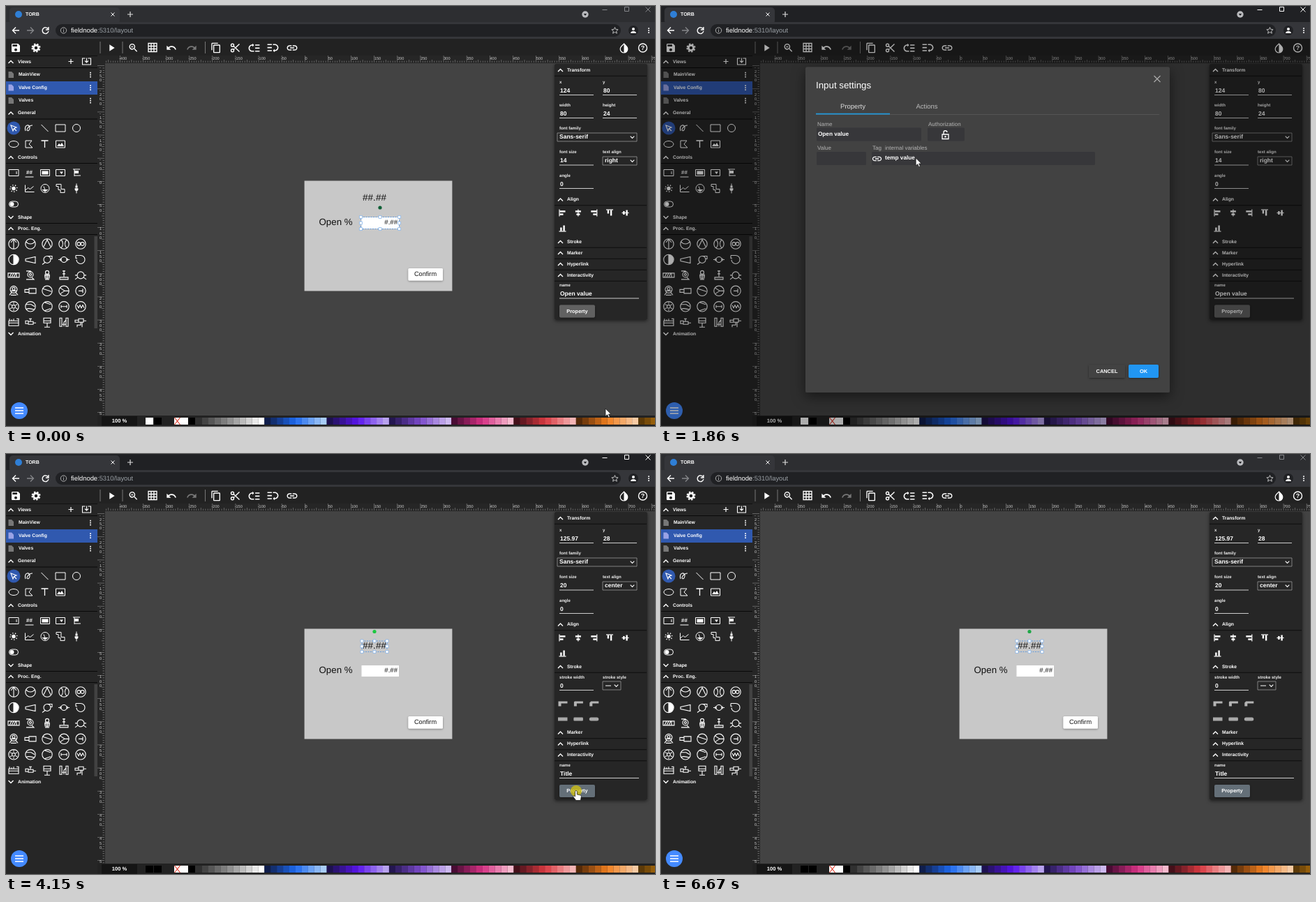
An HTML page with a canvas for the animation above (6.79 s loop, 930 by 602 pixels).

```html
<!DOCTYPE html>
<html lang="en">
<meta charset="utf-8">
<title>View editor</title>
<style>
html, body { margin: 0; width: 100%; height: 100%; overflow: hidden; background: #262626 }
canvas { display: block }
</style>
<canvas id="stage" width="930" height="602"></canvas>
<script>
const LOOP = 6790;
const g = document.getElementById('stage').getContext('2d');
g.textBaseline = 'middle';
g.textRendering = 'geometricPrecision';

// ---- drawing helpers
const box = (x, y, w, h, color, r = 0) => {
  g.fillStyle = color;
  g.beginPath();
  g.roundRect(x, y, w, h, r);
  g.fill();
};
// The shadow is painted around the box only, so translucent boxes stay clean.
const raised = (x, y, w, h, color, r, blur = 3, drop = 1, dark = .4) => {
  g.save();
  const outside = new Path2D();
  outside.rect(0, 0, 930, 602);
  outside.rect(x, y, w, h);
  g.clip(outside, 'evenodd');
  g.shadowColor = `rgba(0,0,0,${dark})`;
  g.shadowBlur = blur;
  g.shadowOffsetY = drop;
  box(x, y, w, h, color, r);
  g.restore();
  box(x, y, w, h, color, r);
};
const text = (s, x, y, size = 6.8, color = '#fff', weight = 'bold', align = 'left') => {
  g.font = `${weight} ${size}px "Liberation Sans", Arial, sans-serif`;
  g.textAlign = align;
  g.fillStyle = color;
  g.fillText(s, x, y);
};
const plain = (s, x, y, size, color = '#fff', align) => text(s, x, y, size, color, 'normal', align);
const at = (x, y, scale, paint) => {
  g.save();
  g.translate(x, y);
  g.scale(scale, scale);
  paint();
  g.restore();
};
const line = (x, y, d, color = '#fff', w = 1, dash = []) => at(x, y, 1, () => {
  g.strokeStyle = color;
  g.lineWidth = w;
  g.setLineDash(dash);
  g.stroke(new Path2D(d));
});
const shape = (x, y, d, color = '#fff', scale = 1) => at(x, y, scale, () => {
  g.fillStyle = color;
  g.fill(new Path2D(d));
});
const glyph = (x, y, d, size = 16, color = '#fff', flipX = 1, flipY = 1) => at(x, y, size / 24, () => {
  g.scale(flipX, flipY);
  shape(-12, -12, d, color);
});
const ring = (r, x = 0, y = 0) => `M${x - r} ${y}a${r} ${r} 0 1 0 ${2 * r} 0a${r} ${r} 0 1 0 ${-2 * r} 0`;
const chevron = (x, y, up = true) => line(x, y, up ? 'M-3.5 2L0-1.5 3.5 2' : 'M-3.5-2L0 1.5 3.5-2', '#fff', 1.4);
const dots = (x, y) => [-3, 0, 3].forEach(d => box(x - .8, y + d - .8, 1.7, 1.7, '#fff'));

// ---- timing helpers
const clamp = v => Math.min(1, Math.max(0, v));
const within = (t, ...spans) => spans.some(([a, b]) => t >= a && t < b);
const bezier = (x1, y1, x2, y2) => x => {
  if (x <= 0 || x >= 1) return clamp(x);
  const f = (a, b, s) => 3 * a * s * (1 - s) ** 2 + 3 * b * s * s * (1 - s) + s ** 3;
  let lo = 0, hi = 1;
  for (let i = 0; i < 20; i++) {
    const mid = (lo + hi) / 2;
    f(x1, x2, mid) < x ? lo = mid : hi = mid;
  }
  return f(y1, y2, lo);
};
const easeEnter = bezier(0, 0, .2, 1);
const easeExit = bezier(.4, 0, .2, 1);
const easeShade = bezier(.25, .8, .25, 1);

const LINK = 'M3.9 12c0-1.71 1.39-3.1 3.1-3.1h4V7H7c-2.76 0-5 2.24-5 5s2.24 5 5 5h4v-1.9H7c-1.71 0-3.1-1.39-3.1-3.1zM8 13h8v-2H8v2zm9-6h-4v1.9h4c1.71 0 3.1 1.39 3.1 3.1s-1.39 3.1-3.1 3.1h-4V17h4c2.76 0 5-2.24 5-5s-2.24-5-5-5z';
const UNDO = 'M12.5 8c-2.65 0-5.05.99-6.9 2.6L2 7v9h9l-3.62-3.62c1.39-1.16 3.16-1.88 5.12-1.88 3.54 0 6.55 2.31 7.6 5.5l2.37-.78C21.08 11.03 17.15 8 12.5 8z';
const SAVE = 'M17 3H5c-1.1 0-2 .9-2 2v14c0 1.1.9 2 2 2h14c1.1 0 2-.9 2-2V7l-4-4zm-5 16c-1.66 0-3-1.34-3-3s1.34-3 3-3 3 1.34 3 3-1.34 3-3 3zm3-10H5V5h10v4z';
const ZOOM = 'M15.5 14h-.79l-.28-.27A6.47 6.47 0 0 0 16 9.5 6.5 6.5 0 1 0 9.5 16c1.61 0 3.09-.59 4.23-1.57l.27.28v.79l5 4.99L20.49 19l-4.99-5zm-6 0C7.01 14 5 11.99 5 9.5S7.01 5 9.5 5 14 7.01 14 9.5 11.99 14 9.5 14zM12 10h-2v2H9v-2H7V9h2V7h1v2h2z';
const COPY = 'M16 1H4c-1.1 0-2 .9-2 2v14h2V3h12V1zm3 4H8c-1.1 0-2 .9-2 2v14c0 1.1.9 2 2 2h11c1.1 0 2-.9 2-2V7c0-1.1-.9-2-2-2zm0 16H8V7h11v14z';
const ORDER = 'M14 5h8v2h-8zm0 5.5h8v2h-8zm0 5.5h8v2h-8zM2 11.5C2 15.08 4.92 18 8.5 18H9v2l3-3-3-3v2h-.5C6.02 16 4 13.98 4 11.5S6.02 7 8.5 7H12V5H8.5C4.92 5 2 7.92 2 11.5z';

function browser(focused) {
  const control = focused ? '#fff' : '#85868a';
  box(0, 0, 930, 23, focused ? '#202124' : '#2d2e31');
  box(5, 2, 158, 24, '#35363a', 5);
  box(0, 23, 930, 24, '#35363a');
  box(71, 26, 810, 18, '#202124', 9);
  shape(18, 12, ring(5), '#2f7fd6');
  text('TORB', 28, 12, 7);
  line(153, 12, 'M-2.5-2.5l5 5m0-5l-5 5', '#fff');
  line(178, 12, 'M-4 0h8M0-4v8', '#ddd', 1.2);
  shape(830, 12, ring(4.7), '#b9babd');
  shape(830, 12, 'M-2.2-1h4.4L0 2z', '#202124');
  line(858, 5.5, 'M-3.5 0h7', control);
  line(889.5, 4.5, 'M-3-3h6v6h-6z', control);
  line(920, 5, 'M-3.5-3.5l7 7m0-7l-7 7', control);
  line(14, 35, 'M5 0h-9.5M0-4.5L-4.5 0 0 4.5', '#fff', 1.4);
  line(35, 35, 'M-5 0h9.5M0-4.5L4.5 0 0 4.5', '#85868a', 1.3);
  line(56.5, 35, 'M3.6-2.4A4.4 4.4 0 1 0 4.4 1M4.4-5v4h-4', '#fff', 1.4);
  line(82.5, 35, ring(4.2) + 'M0-.6v3M0-2.5v1.1', '#bbb', .9);
  plain('fieldnode', 93, 35, 9.4, '#fff');
  plain(':5310/layout', 93 + g.measureText('fieldnode').width, 35, 9.4, '#9aa0a6');
  line(872.5, 35, 'M0-4.5l1.3 3 3.3.3-2.5 2.2.8 3.2L0 2.5l-2.9 1.7.8-3.2-2.5-2.2 3.3-.3z', '#ccc', .9);
  shape(899, 35, ring(7), '#202124');
  shape(899, 35, ring(2, 0, -2) + 'M-4 4c0-4 8-4 8 0z');
  dots(921, 35);
}

function toolbar() {
  box(0, 47, 930, 24, '#222');
  glyph(14, 60, SAVE);
  line(43, 60, ring(3.6), '#fff', 2.7);
  line(43, 60, ring(5.6), '#fff', 1.8, [2.4, 2]);
  for (const x of [134.5, 166.5, 285]) box(x, 51, 1, 17, '#777');
  glyph(151, 60, 'M8 5v14l11-7z');
  glyph(182.5, 60, ZOOM);
  line(210, 59.5, 'M-6-6h12v12h-12zM-6-2h12M-6 2h12M-2-6v12M2-6v12', '#fff', 1.3);
  glyph(237, 60, UNDO);
  glyph(266, 60, UNDO, 16, '#777', -1);
  glyph(301, 60, COPY);
  line(328.5, 60, ring(2, -4, -3.8) + ring(2, -4, 3.8) + 'M-2.4-2.4L6 5.5M-2.4 2.4L6-5.5', '#fff', 1.4);
  glyph(355.5, 60, ORDER, 19, '#fff', 1, -1);
  glyph(382.5, 60, ORDER, 19, '#fff', -1);
  glyph(410, 60, LINK, 18);
  line(885.5, 60, 'M0-6L3.8-2A5.3 5.3 0 1 1-3.8-2z', '#fff', 1.2);
  shape(885.5, 60, 'M0-6L3.8-2A5.3 5.3 0 0 1 0 7z');
  line(912.5, 60, ring(6), '#fff', 1.4);
  text('?', 912.5, 60.3, 9, '#fff', 'bold', 'center');
}

const RING = ring(7.2);
const PROC_ICONS = [
  RING + 'M0-7V7M-4-2L0-7 4-2', RING + 'M-6-3c3 4 9 4 12 0', RING + 'M-5 4L0-6 5 4', RING + 'M-4-6c4 4 3 8 0 12M4-6c-4 4-3 8 0 12', RING + ring(2.4, -2.6) + ring(2.4, 2.6),
  RING + 'M0-7V7', 'M-7-1L7-4V5L-7 2z', ring(5) + 'M-7 7l4-3M0-5h7v4H5', ring(4) + 'M-8 0h4M4 0h4M-5-2v4M5-2v4', 'M-7-6h7a6 6 0 1 1-6 6M-7-6v4h2',
  'M-8-3H8v6H-8zM-6 3l3-6M-3 3l3-6M0 3l3-6M4-3v6', ring(4, 0, -1) + ring(1.5, 0, -1) + 'M-6 6h11L2 3M-6-6h6v2', ring(2.5, 0, -4) + 'M-3-1h6v5h-6zM-3 6h6M0-1v7M-4 1h8', 'M0-7v9M-2-6h4M-6 3h12v3H-6zM-2-2h4', ring(5) + 'M-8 6l4-3M8 6L4 3M-8 0h3M5 0h3',
  ring(5, 0, -2) + ring(2, 0, -3) + 'M-6 6l3-4M6 6L3 2M-4 6h8M-5 0h10', 'M-8-2h6v4h-6zM-2-3.5h10v7H-2z', RING + 'M-6-3L6 1', RING + 'M-5-4L1 0l-6 4M1 0h6', RING + 'M-3 0h6M3-3v6',
  RING + ring(2.4) + 'M-5-3l2 1M5-3L3-2M-5 3l2-1M5 3L3 2M0-6v2M0 4v2', RING + 'M-6-3h7l5 3M-6 4c4-3 7 0 11 0', RING + 'M-4-6l9 3M-4 6l9-3', RING + 'M-4-2v4M4-2v4M-4 0h8', RING + 'M-5-2l2 4 2-4 2 4 2-4 2 4',
  'M-7-2H7v7H-7zM-7 1H7M-6-5v3M-3-4v2M0-5v3M4-5h3v3', 'M-7-2h4v4h-4zM-3-1h7v4h-7zM4 1h4M0-5v4M-2-5h4', 'M-5-6H5V1H-5zM-5-2H5M0 1v6M-4 7h8', 'M-6-6h3V6h-3zM3-6h3V6H3zM-3 3h6M0 0v6M0 0l3-3', 'M-8-3h5v3h-5zM-3-5h7v5h-7zM4-2h4M0 0v4h-5v3M2 0v7',
];

function sidebar() {
  box(0, 71, 131, 531, '#262626');
  const heading = (label, y, up = true) => {
    chevron(7, y, up);
    text(label, 17, y);
    if (up) box(0, y + 8, 131, 1, '#090909');
  };
  box(0, 71, 131, 1, '#111');
  heading('Views', 80);
  line(93, 79.5, 'M-3.5 0h7M0-3.5v7', '#fff', 1.2);
  line(115.5, 79.5, 'M-2-4.5h-4v9H6v-9H2M0-5v6M-2.5-1L0 1.5 2.5-1', '#fff', 1.1);
  box(0, 108, 131, 19, '#3059af');
  ['MainView', 'Valve Config', 'Valves'].forEach((label, i) => {
    const y = 98.5 + i * 18.5;
    shape(7, y, 'M-3.5-4.5h4.5l3 3v6h-7.5z', i == 1 ? '#9aa3e6' : '#777');
    text(label, 18, y);
    dots(121, y);
  });
  heading('General', 153.5);
  shape(11, 175, ring(9.5), '#3059af');
  line(11, 175, 'M-4-4L-1 4 .5.5 4-1zM.5.5L4 4', '#fff', 1.1);
  line(33, 175, 'M-5 4c-3-10 7-10 6-4s-6 4-3 0 5-4 7-4', '#fff', 1.1);
  line(55.5, 175, 'M-5-5L5 5');
  line(78, 175, 'M-7-5H7V5H-7z');
  line(101, 175, ring(5.5));
  line(11, 198, 'M-7 0a7 4.5 0 1 0 14 0a7 4.5 0 1 0-14 0');
  line(33, 198, 'M-5-5h9L0 0l5 5H-5z');
  line(55.5, 198, 'M-5-5H5M0-5V5', '#fff', 1.3);
  line(78, 198, 'M-6.5-5h13V5h-13z');
  shape(78, 198, 'M-5 3l3-4 2 2 2-3 3 5z');

  heading('Controls', 217);
  line(11, 239, 'M-7-4.5H7v9H-7zM4-2v4');
  text('##', 33.5, 239, 8, '#fff', 'bold', 'center');
  line(33.5, 245, 'M-6 0H6');
  line(56, 239, 'M-6.5-4.5h13v9h-13z');
  box(51.5, 236.5, 9, 5, '#fff');
  line(78, 239, 'M-6.5-4.5h13v9h-13z');
  shape(79.5, 239, 'M-2.5-1.5h5L0 2z');
  line(101, 239, 'M-5-5H5M-3-5V5M-3 4H6');
  box(98, 236, 6, 4, '#fff');
  shape(11, 261.5, ring(2.7));
  line(11, 261.5, ring(4.8), '#fff', 1.6, [1.2, 2.57]);
  line(33.5, 261.5, 'M-6-5V5H7M-6 3l4-4 3 2 5-4');
  line(56, 261.5, ring(6) + 'M-4 2H4M0 2l-2-5');
  shape(56, 261.5, 'M-4 2H4L0 5z');
  line(78, 261.5, 'M-6-6h7v7h5v5H0v-4h-3v-5h-3z');
  line(101, 261.5, 'M0-7V7');
  shape(101, 261.5, ring(2.5, 0, 1) + 'M-1.5-4h3v4h-3z');
  line(11, 284, 'M-2.5-4h5a4 4 0 0 1 0 8h-5a4 4 0 0 1 0-8z');
  shape(8.5, 284, ring(3));

  heading('Shape', 303, false);
  box(0, 311, 131, 1, '#090909');
  heading('Proc. Eng.', 319);
  PROC_ICONS.forEach((d, i) => line(11 + i % 5 * 24, 341 + Math.floor(i / 5) * 22.45, d, '#fff', 1.1));
  shape(11, 363.4, 'M0-7a7 7 0 0 1 0 14z');
  box(126.5, 330, 4.5, 132, '#424242');
  heading('Animation', 470, false);
  shape(19, 580, ring(12), '#448aff');
  line(19, 580, 'M-6-4H6M-6 0H6M-6 4H6', '#fff', 1.4);
}

function rulers() {
  const unit = .6625;
  box(131, 71, 799, 11, '#262626');
  box(131, 71, 11, 517, '#262626');
  const length = v => v % 50 == 0 ? 10 : v % 25 == 0 ? 4 : 2.5;
  for (let v = -430; v < 760; v += 5) {
    const x = 428 + v * unit;
    if (x < 142) continue;
    box(x, 81 - length(v), .6, length(v), '#8d8d8d');
    if (v % 50 == 0) plain(v, x + (v < 0 ? -1 : .5), 75, 5.6, '#d0d0d0');
  }
  for (let v = -250; v < 510; v += 5) {
    const y = 251 + v * unit;
    if (y < 82) continue;
    box(141 - length(v), y, length(v), .6, '#8d8d8d');
    if (v % 50 == 0) [...String(v)].forEach((c, i) => plain(c, 134, y + 2.6 + i * 6.3, 5.6, '#d0d0d0'));
  }
}

const RAMPS = ['444444 9a9a9a ffffff', '101e4c 1d69ee a9cdf8', '1d1150 5a14ee b8a2ee', '241650 7b4acb cdb9f0',
  '4a0c34 d53184 f7bacf', '45101a d83840 f4b4b4', '552a08 f07e1e f8cba4', '5c3a08 d98c10 f8dca0']
  .map(r => r.split(' ').map(c => [0, 2, 4].map(k => parseInt(c.slice(k, k + 2), 16))));

function palette(titleSelected) {
  box(131, 587, 799, 15, '#222');
  box(137, 588, 51, 14, '#151515');
  text('100 %', 162.5, 595, 7.6, '#fff', 'bold', 'center');
  box(200, 590, 11, 10, titleSelected ? '#000' : '#fff');
  box(212, 590, 11, 10, '#000');
  box(241, 590, 20, 10, '#fff');
  line(245.5, 595, 'M-4-5L4 5M4-5L-4 5', '#e03020', 1.1);
  box(261, 590, 10, 10, '#000');
  box(271, 590, 10, 10, '#303030');
  for (let i = 0; i < 73; i++) {
    const [dark, mid, light] = RAMPS[Math.floor(i / 10)];
    const k = i % 10 / 4.5;
    const [a, b, f] = k < 1 ? [dark, mid, k] : [mid, light, k - 1];
    box(281 + i * 8.93, 590, 9, 10, `rgb(${a.map((c, n) => Math.round(c + (b[n] - c) * f))})`);
  }
}

function selection(x, y, w, h, knobY, knob) {
  line(x, y, `M0 0h${w}v${h}h${-w}z`, '#4a90e2', .8, [2, 1.5]);
  for (const i of [0, .5, 1]) for (const j of [0, .5, 1]) {
    if (i == .5 && j == .5) continue;
    box(x + w * i - 2, y + h * j - 2, 4, 4, '#fff', .8);
    line(x + w * i, y + h * j, 'M-2-2h4v4h-4z', '#7fb0ea', .7);
  }
  shape(x + w / 2, knobY, ring(2.6), knob);
}

function canvasView(titleSelected, hot) {
  box(142, 82, 788, 505, '#434343');
  box(427.6, 250.5, 211.8, 158, '#c8c8c8');
  plain('##.##', 528, 275.5, 13.5, '#111', 'center');
  plain('Open %', 448.5, 310.5, 13.3, '#111');
  box(509.5, 303, 53.5, 16, '#fff');
  plain('#.##', 561, 310.7, 9.6, '#111', 'right');
  raised(576.5, 376, 49.5, 17.5, '#fff', 1.5);
  plain('Confirm', 601, 384.5, 9.2, '#111', 'center');
  if (titleSelected) selection(510, 268, 36, 15.5, 254.5, hot ? '#1cc840' : '#20a848');
  else selection(508.5, 302.5, 55, 17, 289, '#0d5f35');
}

function alignIcon(x, y, anchor, vertical) {
  at(x, y, 1, () => {
    if (vertical) g.rotate(Math.PI / 2);
    box(anchor * 4.5 - .6, -5, 1.2, 10, '#fff');
    [[8, -3.3], [5, .9]].forEach(([w, top]) => box((anchor * (8 - w) - w) / 2, top, w, 2.4, '#fff'));
  });
}

function propertyPanel(titleSelected, lit) {
  const up = titleSelected ? 33 : 0;
  const low = titleSelected ? 45.6 : 0;
  raised(786, 83, 133, titleSelected ? 413 : 367, '#262626', 2, 5, 1.5, .55);
  const heading = (label, y) => {
    chevron(794.5, y);
    text(label, 804, y);
    box(786, y + 7.7, 132, 1, '#0c0c0c');
  };
  const field = (label, value, x, y, w = 49) => {
    text(label, x, y, 6.1, '#eee');
    text(value, x + 1, y + 12.6, 8.5);
    box(x, y + 18, w, .9, '#ccc');
  };
  const select = (value, x, y, w) => {
    line(x, y, `M0-6h${w}V6H0z`, '#999', .8);
    text(value, x + 3, y, 8.5);
    line(x + w - 6.5, y, 'M-2.8-1.3L0 1.5 2.8-1.3', '#fff', 1.1);
  };
  heading('Transform', 92);
  field('x', titleSelected ? '125.97' : '124', 793, 109);
  field('y', titleSelected ? '28' : '80', 855, 109);
  if (!titleSelected) {
    field('width', '80', 793, 142);
    field('height', '24', 855, 142);
  }
  text('font family', 793, 175 - up, 6.1, '#eee');
  select('Sans-serif', 790, 188 - up, 114);
  field('font size', titleSelected ? '20' : '14', 793, 209.5 - up);
  text('text align', 855, 209 - up, 6.1, '#eee');
  select(titleSelected ? 'center' : 'right', 855, 222 - up, 49);
  field('angle', '0', 793, 243 - up);
  heading('Align', 277.5 - up);
  [-1, 0, 1].forEach((a, i) => alignIcon(797.5 + i * 22.4, 296.5 - up, a));
  alignIcon(865, 296.5 - up, -1, true);
  alignIcon(887.5, 296.5 - up, 0, true);
  alignIcon(797.5, 318.5 - up, 1, true);
  heading('Stroke', 338 - up);
  if (titleSelected) {
    field('stroke width', '0', 793, 320);
    text('stroke style', 855, 320, 6.1, '#eee');
    select('', 855, 332, 26);
    box(859, 331.6, 8, 1, '#fff');
    [0, 1, 2].forEach(i => {
      shape(797.5 + i * 22.4, 357.5, `M${-6 + i} -3H7V0H-2V4H-6V${-3 + i}z`, '#b4b4b4');
      box(791 + i * 22.4, 377.5, 13.5, 5, '#a8a8a8', i * 1.25);
    });
  }
  heading('Marker', 354 + low);
  heading('Hyperlink', 370 + low);
  heading('Interactivity', 386 + low);
  field('name', titleSelected ? 'Title' : 'Open value', 793, 400.5 + low, 114);
  raised(793, 428.5 + low, 51, 18, lit ? '#646f78' : '#616161', 2);
  text('Property', 818.5, 437.5 + low, 7.4, '#fff', 'bold', 'center');
}

function dialog(output, open, alpha, buttonFill, selected) {
  at(468, 320.5, .7 + .3 * open, () => {
    g.translate(-468, -320.5);
    g.globalAlpha = alpha;
    raised(207, 87.5, 522, 466.5, '#424242', 2.5, 18, 6, .5);

    const input = (x, y, w) => box(x, y, w, 19, '#37373a', 1.5);
    const label = (s, x, y) => plain(s, x, y, 8, '#b4b4b4');
    plain((output ? 'Output' : 'Input') + ' settings', 222, 114, 13.3);
    line(711, 104.5, 'M-4.5-4.5l9 9m0-9l-9 9', '#aaa', 1.2);
    plain('Property', 275, 144, 9.5, '#ddd', 'center');
    plain('Actions', 381, 144, 9.5, '#bbb', 'center');
    box(222, 155, 492, .8, '#5a5a5a');
    box(222, 153.8, 106, 1.6, '#2196d8');
    label('Name', 224, 170);
    label('Authorization', 383, 170);
    input(223, 174.5, 150);
    input(382, 174.5, 53);
    text(output ? 'Title' : 'Open value', 225, 184, 8.2);
    line(407.5, 186.5, 'M-4.5-2.5h9v6.5h-9zM-2.5-2.5v-2.5a2.5 2.5 0 0 1 5-.5', '#fff', 1.3);
    shape(407.5, 187.2, ring(1.2));

    if (selected > .6) {
      box(303, 199.5, 13, 9.5, '#45709f');
      box(320, 199.5, 62, 9.5, '#45709f');
    }
    const rows = output ? ['Value', 'Unit', 'Format digits'] : ['Value'];
    rows.forEach((name, i) => {
      const y = 204 + i * 31.3;
      label(name, 224, y);
      label('Tag', 303, y);
      input(223, y + 5, 71);
      input(302, y + 5, 320);
      glyph(309.5, y + 15, LINK, 16);
    });
    label('internal variables', 321, 204);
    if (selected) {
      const w = 43 * Math.min(1, selected / .6);
      box(364 - w, 213, w, 10, '#2a80dc');
    }
    text(output ? 'title string' : 'temp value', 321, 218, 8.2);
    if (output) box(223, 296.5, 491, .8, '#393939');

    const button = (s, x, w, color) => {
      g.globalAlpha = alpha * buttonFill;
      raised(x, 514, w, 19, color, 2);
      g.globalAlpha = alpha;
      text(s, x + w / 2, 523.5, 7.4, '#fff', 'bold', 'center');
    };
    button('CANCEL', 613, 52, '#424242');
    button('OK', 670, 43, '#2196f3');
  });
}

// Cursor path: [time, x, y]
const PATH = [[0, 859, 577], [100, 859, 577], [420, 848, 505], [720, 828, 437], [820, 828, 435], [1410, 828, 435],
  [1600, 620, 330], [1860, 366, 218], [2010, 238, 192], [2270, 690, 508], [2490, 680, 512], [2760, 638, 519],
  [2900, 638, 519], [3090, 545, 372], [3400, 518, 283], [3560, 518, 280], [4020, 817, 483], [4400, 817, 483],
  [4900, 288, 236], [5100, 378, 260], [5560, 688, 520], [5640, 689, 523], [6060, 689, 523], [6440, 780, 612], [6790, 780, 640]];

function cursor(t) {
  const i = PATH.findIndex(k => k[0] > t);
  const [t0, x0, y0] = PATH[i - 1], [t1, x1, y1] = PATH[i];
  const f = (t - t0) / (t1 - t0);
  const x = x0 + (x1 - x0) * f, y = y0 + (y1 - y0) * f;
  if (within(t, [1130, 1260], [1870, 2060], [2840, 2960], [3480, 3570], [4110, 4230]))
    shape(x, y, ring(8), 'rgba(205,190,20,.8)');
  const hand = within(t, [680, 1290], [2660, 2960], [3990, 4330], [5560, 5935]);
  const d = hand
    ? 'M-1.5.8c0-1.8 2.8-1.8 2.8 0v4.2l4.6 1c1.1.3 1.6 1.1 1.4 2.2l-.9 5.3h-6.6l-3.8-5c-.6-1 .6-2 1.5-1.3l1 .8z'
    : 'M0 0v11.2l2.6-2.4 1.8 4 1.9-.8-1.8-3.9h3.5z';
  shape(x, y, d);
  line(x, y, d, '#111', .7);
}

const DIALOGS = [{ start: 1273, end: 2895, output: false }, { start: 4300, end: 5932, output: true }];

function render() {
  const t = performance.now() % LOOP;
  const titleSelected = t >= 3530;
  browser(t >= 100 && t < 6670);
  toolbar();
  canvasView(titleSelected, t < 4240);
  rulers();
  sidebar();
  palette(titleSelected);
  propertyPanel(titleSelected, within(t, [690, 1500], [3090, 3530], [3990, 4420], [6100, LOOP]));
  for (const { start, end, output } of DIALOGS) {
    if (t < start || t > end + 400) continue;
    const shadeIn = easeShade((t - start) / 400);
    const shade = shadeIn * (1 - easeShade((t - end) / 400));
    box(0, 47, 930, 555, `rgba(0,0,0,${.32 * shade})`);
    const open = easeEnter((t - start) / 150);
    const alpha = open * (1 - easeExit((t - end) / 75));
    if (alpha > 0) dialog(output, open, alpha, shadeIn, output ? 0 : clamp((t - 1870) / 130));
  }
  cursor(t);
  requestAnimationFrame(render);
}
render();
</script>
</html>
```
